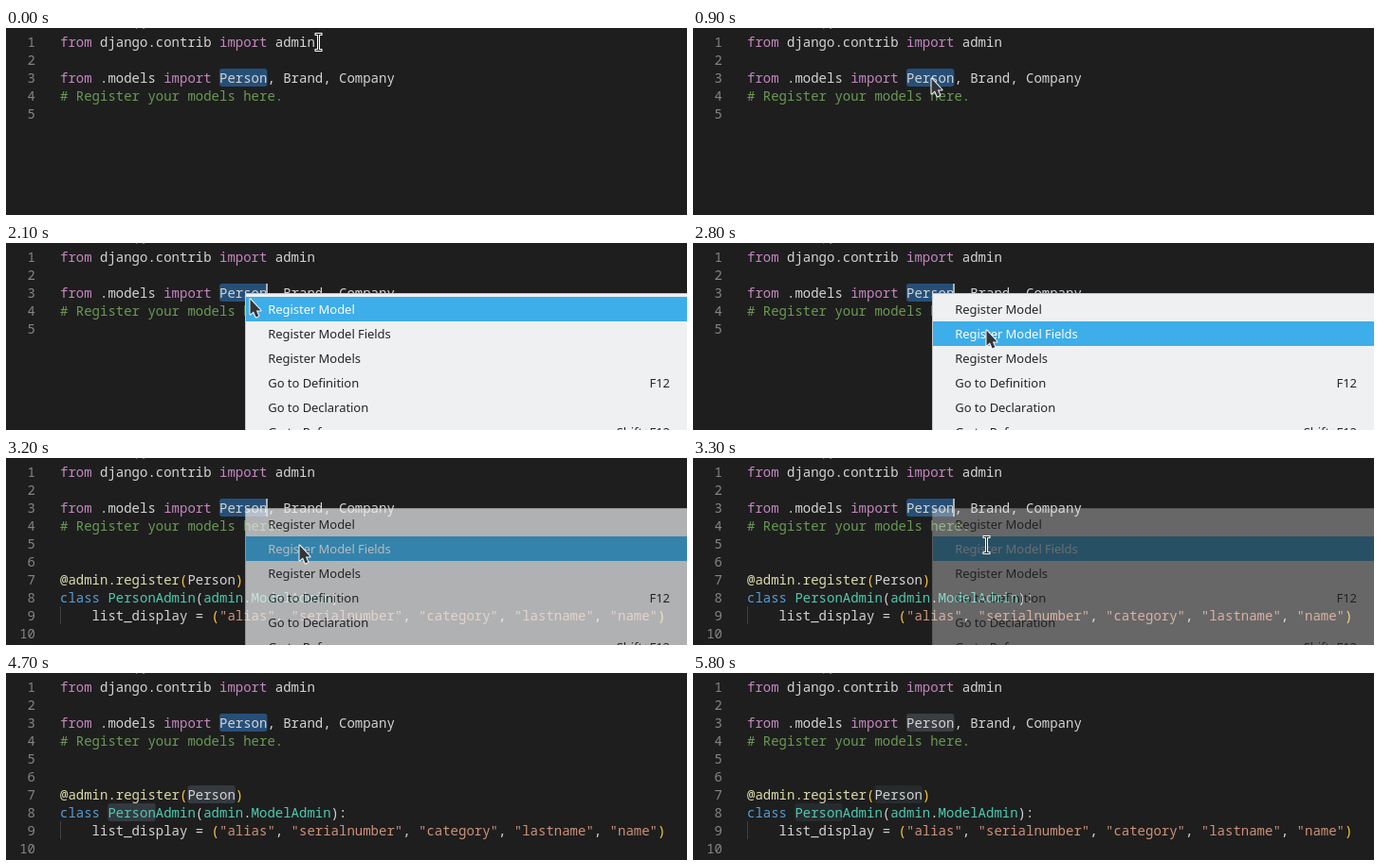
These frames come from a looping animation (718x198 px, 6000 ms). An HTML page with a canvas:

```html
<!DOCTYPE html>
<html lang="en">
<head>
<meta charset="utf-8">
<title>Code editor</title>
<style>
  html, body { margin: 0; width: 100%; height: 100%; overflow: hidden; background: #1e1e1e; }
  canvas { display: block; }
</style>
</head>
<body>
<canvas id="stage" width="718" height="198"></canvas>
<script>
const ctx = document.getElementById('stage').getContext('2d');
const LOOP = 6000, STEP = 100;
const LEFT = 57, CHAR = 8.4, LINE = 19, TOP = 5;
const CODE_FONT = '14px "Noto Sans Mono", monospace';
const MENU_FONT = '13px "Noto Sans", sans-serif';

const COLORS = {
  keyword: '#c586c0', plain: '#d4d4d4', comment: '#6a9955', call: '#dcdcaa',
  bracket: '#ffc83d', storage: '#569cd6', type: '#4ec9b0', string: '#ce9178'
};

const fields = ['alias', 'serialnumber', 'category', 'lastname', 'name'];
const fieldTokens = fields.flatMap((name, i) =>
  [['plain', i ? ', ' : ''], ['string', `"${name}"`]]);

const lines = [
  [['keyword', 'from'], ['plain', ' django.contrib '], ['keyword', 'import'], ['plain', ' admin']],
  [],
  [['keyword', 'from'], ['plain', ' .models '], ['keyword', 'import'], ['plain', ' Person, Brand, Company']],
  [['comment', '# Register your models here.']],
  [],
  [],
  [['call', '@admin.register'], ['bracket', '('], ['plain', 'Person'], ['bracket', ')']],
  [['storage', 'class'], ['type', ' PersonAdmin'], ['plain', '('], ['type', 'admin'],
   ['plain', '.'], ['type', 'ModelAdmin'], ['plain', '):']],
  [['plain', '    list_display = '], ['bracket', '('], ...fieldTokens, ['bracket', ')']],
  []
];

const menu = { x: 252, y: 53, row: 26 };
const menuItems = [
  ['Register Model'], ['Register Model Fields'], ['Register Models'],
  ['Go to Definition', 'F12'], ['Go to Declaration'], ['Go to References', 'Shift+F12']
];

// Held keys: [time, value...]
const menuAlpha = [
  [0, 0], [1500, .02], [1600, .12], [1700, .34], [1800, .7], [1900, 1],
  [3200, .7], [3300, .35], [3400, .13], [3500, .035], [3600, .015], [3700, .005], [3800, 0]
];
const menuChoice = [[0, -1], [2100, 0], [2400, 1]];
const caretShown = [
  [0, 0], [1600, 1], [2300, 0], [2800, 1], [3700, 0], [4200, 1], [4700, 0], [5200, 1], [5700, 0]
];
const pointer = [
  [0, 'beam', 330, 15], [100, 'beam', 325, 18], [200, 'beam', 311, 28], [300, 'beam', 291, 41],
  [400, 'beam', 271, 54], [500, 'beam', 258, 63], [600, 'beam', 254, 65], [800, 'beam', 253, 54],
  [900, 'arrow', 251, 53], [2100, 'arrow', 257, 59], [2200, 'arrow', 273, 69],
  [2300, 'arrow', 290, 79], [2400, 'arrow', 300, 87], [2600, 'arrow', 309, 92],
  [3300, 'beam', 310, 92], [3900, 'beam', 330, 82], [4000, 'beam', 346, 65],
  [4100, 'beam', 350, 46], [4200, 'beam', 320, 29], [4300, 'beam', 270, 15],
  [4400, 'beam', 222, 4], [4500, 'none']
];

const keyAt = (keys, t) => keys.findLast(key => key[0] <= t).slice(1);

function fillBox(color, x, y, w, h, radius = 0) {
  ctx.fillStyle = color;
  ctx.beginPath();
  ctx.roundRect(x, y, w, h, radius);
  ctx.fill();
}

function write(text, x, y, color, align = 'left') {
  ctx.fillStyle = color;
  ctx.textAlign = align;
  ctx.fillText(text, x, y);
}

function markWord(row, column, color) {
  fillBox(color, LEFT + column * CHAR, TOP + (row - 1) * LINE, 6 * CHAR, LINE, 3);
}

function drawCode(t) {
  const expanded = t >= 3200 && t < LOOP;
  const blurred = t >= 5800;
  markWord(3, 20, blurred ? '#3a3d41' : '#264f78');
  if (t >= 3500) {
    const tint = `rgba(173, 214, 255, ${blurred ? .07 : .15})`;
    markWord(7, 16, tint);
    markWord(8, 6, tint);
  }
  ctx.font = '13px "Noto Sans", sans-serif';
  write('py', 136, -2, '#777');
  ctx.font = CODE_FONT;
  lines.slice(0, expanded ? 10 : 5).forEach((tokens, i) => {
    const baseline = TOP + i * LINE + 15;
    let x = LEFT;
    write(i + 1, 31, baseline, '#858585', 'right');
    for (const [kind, text] of tokens) {
      write(text, x, baseline, COLORS[kind]);
      x += text.length * CHAR;
    }
  });
  if (expanded) fillBox('#404040', LEFT, TOP + 8 * LINE, 1, LINE);
  if (keyAt(caretShown, t)[0]) fillBox('#aeafad', 274, 43, 2, LINE);
}

// The menu is opaque on its own layer, so it fades as one picture.
const layer = document.createElement('canvas');
layer.width = 718;
layer.height = 198;
const layerCtx = layer.getContext('2d');

function drawMenu(t) {
  const [alpha] = keyAt(menuAlpha, t);
  if (!alpha) return;
  const [choice] = keyAt(menuChoice, t);
  const g = layerCtx;
  g.fillStyle = '#c4c6c7';
  g.fillRect(menu.x, menu.y, 480, 160);
  g.fillStyle = '#eff0f1';
  g.fillRect(menu.x + 1, menu.y + 1, 480, 160);
  g.font = MENU_FONT;
  g.letterSpacing = '-0.05px';
  menuItems.forEach(([label, shortcut = ''], i) => {
    const y = menu.y + 4 + i * menu.row;
    const chosen = i === choice;
    if (chosen) {
      g.fillStyle = '#3daee9';
      g.fillRect(menu.x + 1, y, 480, menu.row);
    }
    g.fillStyle = chosen ? '#fcfcfc' : '#232629';
    g.textAlign = 'left';
    g.fillText(label, 276.3, y + 18);
    g.textAlign = 'right';
    g.fillText(shortcut, 700, y + 18);
  });
  ctx.globalAlpha = alpha;
  ctx.drawImage(layer, 0, 0);
  ctx.globalAlpha = 1;
}

const arrow = new Path2D('M.5 .5V16.5L4 13.6L6.6 19.5L9.4 18.2L6.9 12.6H11.6Z');
const beam = new Path2D('M-2.5 -8.5H2.5M-2.5 8.5H2.5M0 -8.5V8.5');

function drawPointer(t) {
  const [shape, x, y] = keyAt(pointer, t);
  if (shape === 'none') return;
  ctx.save();
  if (shape === 'arrow') {
    ctx.translate(x, y);
    ctx.lineJoin = 'round';
    ctx.lineWidth = 2;
    ctx.strokeStyle = '#fcfcfc';
    ctx.stroke(arrow);
    ctx.fillStyle = '#31363b';
    ctx.fill(arrow);
  } else {
    ctx.translate(x - .5, y);
    ctx.lineCap = 'square';
    for (const [color, width] of [['#fcfcfc', 3], ['#1b1e20', 1]]) {
      ctx.strokeStyle = color;
      ctx.lineWidth = width;
      ctx.stroke(beam);
    }
  }
  ctx.restore();
}

const start = performance.now();

function draw() {
  const elapsed = Math.max(0, performance.now() - start) % LOOP;
  const t = Math.floor(elapsed / STEP) * STEP;
  fillBox('#1e1e1e', 0, 0, 718, 198);
  drawCode(t);
  drawMenu(t);
  drawPointer(t);
  requestAnimationFrame(draw);
}
draw();
</script>
</body>
</html>
```
